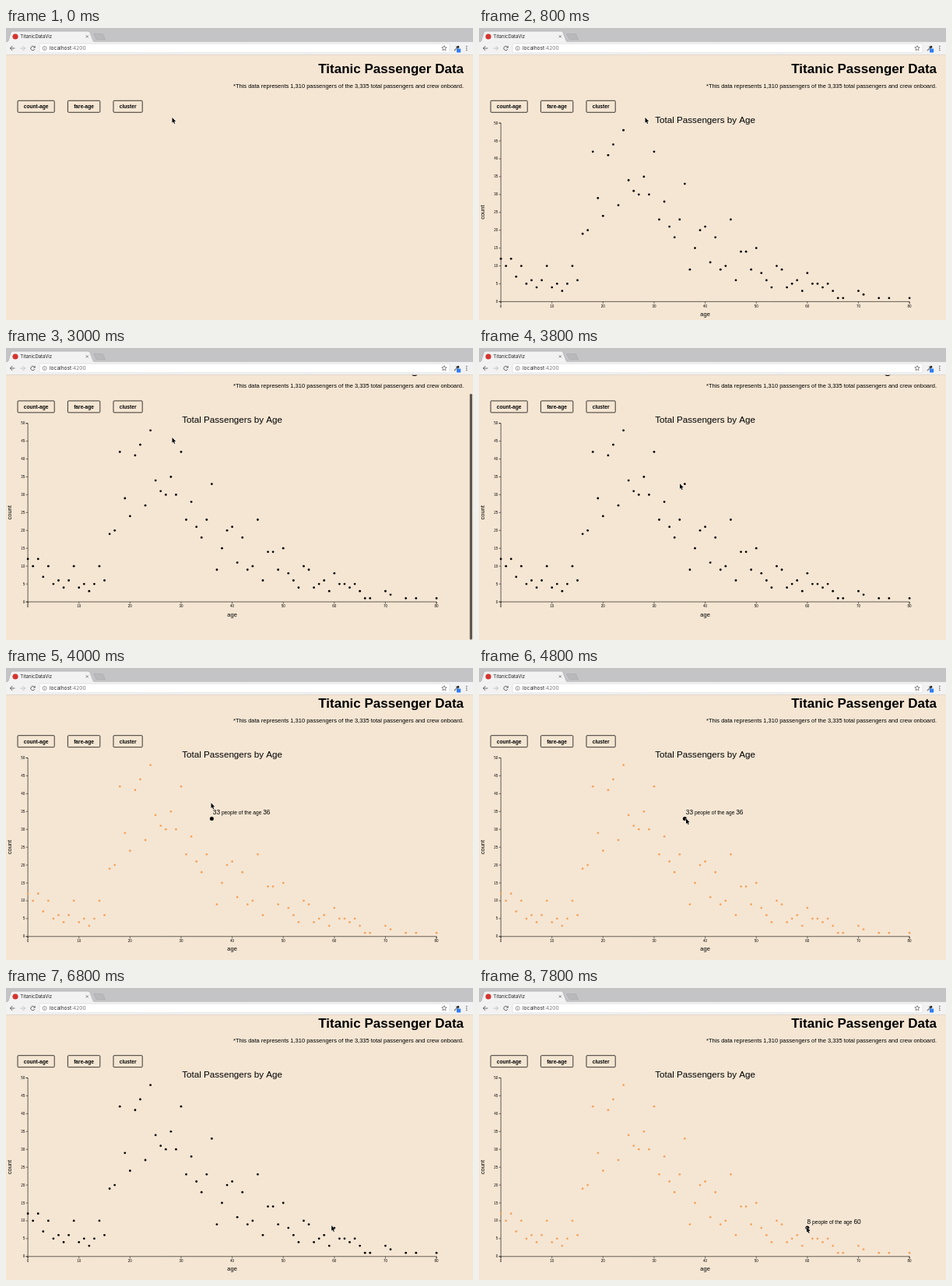
Recreate the animation shown at these times as an HTML page with a canvas. Size 600x375 px, loop 8000 ms.

```html
<!DOCTYPE html>
<html lang="en">
<head>
<meta charset="utf-8">
<title>Passenger scatter plot</title>
<style>
html, body { margin: 0; width: 100%; height: 100%; overflow: hidden; background: #f5e6d3; }
canvas { display: block; width: 600px; height: 375px; }
</style>
</head>
<body>
<canvas id="stage"></canvas>
<script>
const W = 600, H = 375, LOOP = 8000;
const SANS = '"Liberation Sans", Arial, sans-serif';
const UI = 'Inter, Roboto, sans-serif';
const BG = '#f5e6d3', INK = '#000', FADED = '#f4a460';
const TOP = 34.5;

// Passenger count for each age from 0 to 80.
const COUNTS = [
  12, 10, 12, 7, 10, 5, 6, 4, 6, 10, 4, 5, 3, 5, 10, 6, 19, 20, 42, 29,
  24, 41, 44, 27, 48, 34, 31, 30, 35, 30, 42, 23, 28, 21, 18, 23, 33, 9, 15, 20,
  21, 11, 18, 9, 10, 23, 6, 14, 14, 9, 15, 8, 6, 4, 10, 9, 4, 5, 6, 3,
  8, 5, 5, 4, 5, 3, 1, 1, 0, 0, 3, 2, 0, 0, 1, 0, 1, 0, 0, 0, 1
];
const PLOT = { left: 28.1, right: 553.1, top: 122.1, bottom: 351.4 };
const px = age => PLOT.left + age * (PLOT.right - PLOT.left) / 80;
const py = n => PLOT.bottom - n * (PLOT.bottom - PLOT.top) / 50;

// Step tracks: [start time, value...]
const SCROLL = [[0, 0], [2600, 17.2], [2800, 25.4], [4000, 6.6]];
const BAR = [[0, 0], [2600, 0.62], [3400, 0.3], [3600, 0]];
const HOVER = [[0, -1], [4000, 36, 265.8], [4200, -1], [4800, 36, 265.8], [6200, -1], [7000, 60, 421.6]];
const POINTER = [
  [0, 213.5, 115], [3600, 240, 150], [3800, 258, 174.2], [4000, 263.5, 173.3],
  [4400, 265.3, 180.3], [4600, 264, 191], [4800, 266, 193.3], [6000, 272.6, 193.3],
  [6200, 419, 249.5], [6400, 436, 283.8], [6600, 424.3, 299.8], [6800, 418.2, 305], [7200, 421, 307]
];

function at(track, t) {
  let hit = track[0];
  for (const key of track) if (key[0] <= t) hit = key;
  return hit.slice(1);
}

const canvas = document.getElementById('stage');
const ctx = canvas.getContext('2d');
const dpr = window.devicePixelRatio || 1;
canvas.width = W * dpr;
canvas.height = H * dpr;

function text(str, x, y, size, { font = SANS, weight = 400, align = 'left', color = INK } = {}) {
  ctx.font = `${weight} ${size}px ${font}`;
  ctx.textAlign = align;
  ctx.fillStyle = color;
  ctx.fillText(str, x, y);
  return ctx.measureText(str).width;
}

function poly(points, close) {
  ctx.beginPath();
  points.forEach(([x, y]) => ctx.lineTo(x, y));
  if (close) ctx.closePath();
}

function line(points, color, width) {
  poly(points);
  ctx.strokeStyle = color;
  ctx.lineWidth = width;
  ctx.stroke();
}

function fill(points, color) {
  poly(points, true);
  ctx.fillStyle = color;
  ctx.fill();
}

function dot(x, y, r, color) {
  ctx.beginPath();
  ctx.arc(x, y, r, 0, Math.PI * 2);
  ctx.fillStyle = color;
  ctx.fill();
}

function box(x, y, w, h, r, color, stroke, width) {
  ctx.beginPath();
  ctx.roundRect(x, y, w, h, r);
  if (color) { ctx.fillStyle = color; ctx.fill(); }
  if (stroke) { ctx.strokeStyle = stroke; ctx.lineWidth = width; ctx.stroke(); }
}

function button(label, x, w) {
  box(x, 93.3, w, 15, 1, null, '#1a1714', 0.85);
  text(label, x + w / 2, 103.1, 6.67, { weight: 700, align: 'center' });
}

function axes() {
  const { left, right, top, bottom } = PLOT;
  const tick = 2.6, color = '#15120f';
  line([[left - tick, top], [left, top], [left, bottom], [left - tick, bottom]], color, 0.65);
  line([[left, bottom + tick], [left, bottom], [right, bottom], [right, bottom + tick]], color, 0.65);
  for (let n = 0; n <= 50; n += 5) {
    line([[left - tick, py(n)], [left, py(n)]], color, 0.55);
    text(n, left - 3.9, py(n) + 1.5, 4.5, { align: 'right' });
  }
  for (let age = 0; age <= 80; age += 10) {
    line([[px(age), bottom], [px(age), bottom + tick]], color, 0.55);
    text(age, px(age), bottom + 7.3, 4.5, { align: 'center' });
  }
  text('age', 290.6, 370, 7.5, { align: 'center' });
  ctx.save();
  ctx.translate(7.3, 236.7);
  ctx.rotate(-Math.PI / 2);
  text('count', 0, 0, 7.5, { align: 'center' });
  ctx.restore();
}

function tooltip(age, x) {
  const y = py(COUNTS[age]) - 5;
  x += text(COUNTS[age], x, y, 8.33);
  x += text(' people of the age ', x, y, 6.67);
  text(age, x, y, 8.33);
}

function plot(active, tipX) {
  text('Total Passengers by Age', 290.6, 121.8, 11.67, { align: 'center' });
  axes();
  COUNTS.forEach((n, age) => {
    if (!n) return;
    const on = age === active;
    dot(px(age), py(n), on ? 2.5 : 1.4, active < 0 || on ? INK : FADED);
  });
  if (active >= 0) tooltip(active, tipX);
}

function page(t) {
  const [scroll] = at(SCROLL, t);
  ctx.save();
  ctx.translate(0, -scroll);
  text('Titanic Passenger Data', 588, 58, 17, { weight: 700, align: 'right' });
  text('*This data represents 1,310 passengers of the 3,335 total passengers and crew onboard.',
    588, 76.6, 7.5, { align: 'right' });
  button('count-age', 15, 47.2);
  button('fare-age', 79.4, 41.4);
  button('cluster', 138, 37.2);
  if (t >= 600) plot(...at(HOVER, t));
  ctx.restore();

  const [alpha] = at(BAR, t);
  if (alpha) {
    const view = H - TOP, ratio = view / (view + 25.4);
    box(595.8, TOP + scroll * ratio + 0.5, 3.2, view * ratio - 1, 1.6, `rgba(0,0,0,${alpha})`);
  }
}

function tabs() {
  ctx.fillStyle = '#c4c4c6';
  ctx.fillRect(0, 0, W, 18);
  ctx.fillStyle = '#f2f2f2';
  ctx.fillRect(0, 17.5, W, 17);
  line([[0, 17.6], [W, 17.6]], '#b0b0b2', 0.5);
  fill([[1, 18.2], [3, 16.8], [6.5, 5.2], [8, 4.2], [106, 4.2], [107.6, 5.2], [112, 16.8], [114, 18.2]], '#f2f2f2');
  line([[1, 17.6], [3, 16.8], [6.5, 5.2], [8, 4.2], [106, 4.2], [107.6, 5.2], [112, 16.8], [114, 17.6]], '#a9a9ab', 0.5);
  poly([[112.8, 7.6], [124.3, 7.6], [127.6, 14.6], [116.3, 14.8]], true);
  ctx.fillStyle = '#b9b9bb';
  ctx.fill();
  ctx.strokeStyle = '#a5a5a7';
  ctx.stroke();
  dot(12, 11, 3.6, '#d6352f');
  text('TitanicDataViz', 18.3, 13.1, 6, { font: UI, color: '#222' });
  line([[102.8, 9.4], [105.8, 12.4]], '#555', 0.7);
  line([[105.8, 9.4], [102.8, 12.4]], '#555', 0.7);
}

function arrow(x, dir, color) {
  line([[x - 3 * dir, 26], [x + 3 * dir, 26]], color, 0.9);
  line([[x, 23], [x + 3 * dir, 26], [x, 29]], color, 0.9);
}

function star(x, y, r) {
  const points = [];
  for (let i = 0; i < 10; i++) {
    const a = -Math.PI / 2 + i * Math.PI / 5, d = i % 2 ? r * 0.45 : r;
    points.push([x + d * Math.cos(a), y + d * Math.sin(a)]);
  }
  poly(points, true);
  ctx.strokeStyle = '#555';
  ctx.lineWidth = 0.7;
  ctx.stroke();
}

function toolbar() {
  arrow(8.3, -1, '#555');
  arrow(21.5, 1, '#bcbcbc');
  ctx.beginPath();
  ctx.arc(34.5, 26, 2.7, 0.4, 5.5);
  ctx.strokeStyle = '#555';
  ctx.lineWidth = 0.9;
  ctx.stroke();
  fill([[37.6, 22.8], [37.6, 25.6], [34.8, 25.6]], '#555');

  box(43.2, 20.2, 526.6, 11.6, 1.4, '#fff', '#d2d2d2', 0.5);
  ctx.beginPath();
  ctx.arc(49.6, 26, 2.6, 0, Math.PI * 2);
  ctx.strokeStyle = '#666';
  ctx.lineWidth = 0.6;
  ctx.stroke();
  line([[49.6, 25.5], [49.6, 27.5]], '#666', 0.7);
  dot(49.6, 24.5, 0.4, '#666');
  const w = text('localhost', 56, 28.3, 6.6, { font: UI, color: '#222' });
  text(':4200', 56 + w, 28.3, 6.6, { font: UI, color: '#777' });
  star(563, 26, 3.4);

  line([[576, 29.2], [579.5, 25.4]], '#666', 1.2);
  line([[578.2, 23.8], [581, 26.6]], '#222', 1);
  dot(580.8, 24.2, 1.5, '#222');
  box(579, 26.4, 5.2, 5, 0.7, '#2f7df6');
  for (const y of [23.5, 26, 28.5]) dot(591.8, y, 0.75, '#555');
  line([[0, 34.4], [W, 34.4]], '#c9c3bb', 0.5);
}

function pointer(t) {
  const [x, y] = at(POINTER, t);
  const shape = [[0, 0], [0, 6.8], [1.5, 5.4], [2.6, 8], [3.7, 7.5], [2.6, 5], [4.7, 4.9]]
    .map(([dx, dy]) => [x + dx, y + dy]);
  poly(shape, true);
  ctx.lineJoin = 'round';
  ctx.strokeStyle = '#fff';
  ctx.lineWidth = 0.9;
  ctx.stroke();
  ctx.lineJoin = 'miter';
  fill(shape, INK);
}

function draw(now) {
  const t = now % LOOP;
  ctx.setTransform(dpr, 0, 0, dpr, 0, 0);
  ctx.fillStyle = BG;
  ctx.fillRect(0, 0, W, H);
  page(t);
  tabs();
  toolbar();
  pointer(t);
}

const start = performance.now();
function tick() {
  draw(performance.now() - start);
  requestAnimationFrame(tick);
}
tick();
</script>
</body>
</html>
```
